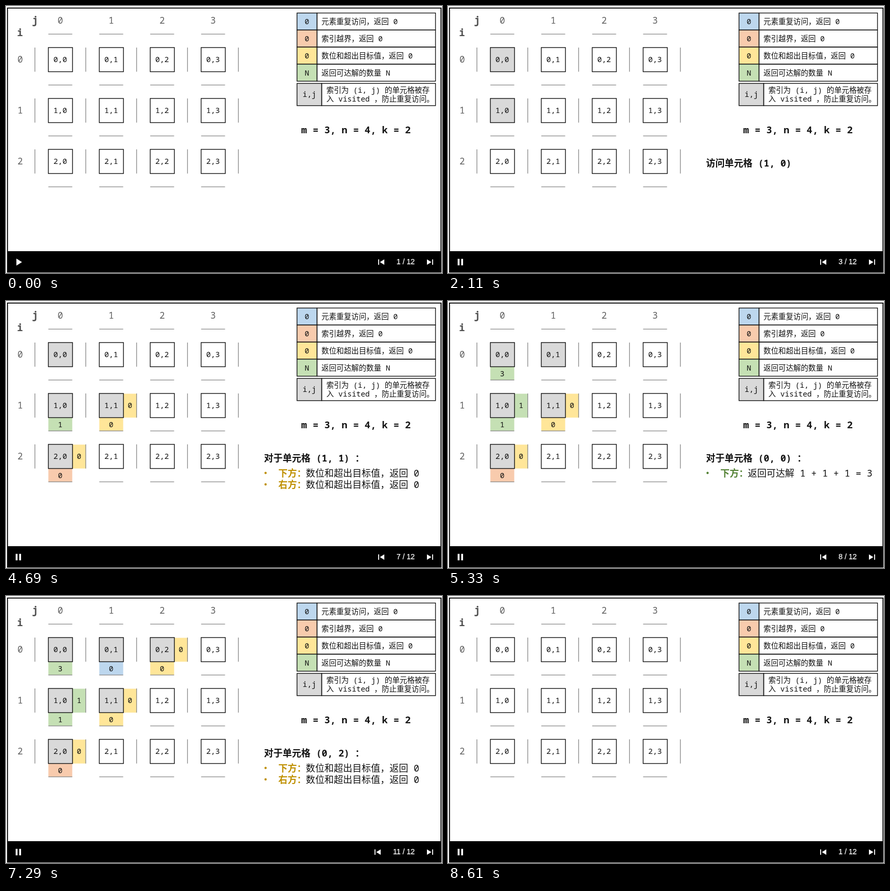
Animation, 839 px wide and 514 px high, one loop 8.66 s. Source, as an HTML page:

```html
<!DOCTYPE html>
<html lang="zh-CN">
<head>
<meta charset="utf-8">
<title>DFS</title>
<style>
  html, body { margin: 0; width: 100%; height: 100%; overflow: hidden; background: #fff; }
  svg { display: block; }
  text { font-family: "Noto Sans Mono", "Noto Sans CJK SC", "Noto Sans CJK", monospace; white-space: pre; }
  .ui { font-family: "Liberation Sans", Arial, sans-serif; }
</style>
</head>
<body>
<svg id="stage" width="839" height="514" viewBox="0 0 839 514"></svg>
<script>
const LOOP = 8660;
const SLIDE_AT = [0, 1470, 2110, 2750, 3410, 4070, 4690, 5330, 5990, 6650, 7290, 7950, 8610];
const PLAY_AT = 660;
const FILL = { gray: '#d9d9d9', blue: '#bdd7ee', orange: '#f8cbad', yellow: '#ffe699', green: '#c5e0b4' };
const INK = { blue: '#2e75b6', orange: '#c55a11', yellow: '#bf9000', green: '#548235' };
const STEP = 98, SIZE = 46.5, LEFT = 81.5, TOP = 80;
const stage = document.getElementById('stage');

function add(parent, tag, attrs, content) {
  const el = document.createElementNS('http://www.w3.org/2000/svg', tag);
  for (const k in attrs) el.setAttribute(k, attrs[k]);
  if (content !== undefined) el.textContent = content;
  parent.appendChild(el);
  return el;
}
const group = (parent = stage) => add(parent, 'g', {});
const rect = (p, x, y, width, height, attrs) => add(p, 'rect', { x, y, width, height, ...attrs });
const path = (p, d, attrs) => add(p, 'path', { d, ...attrs });
const text = (p, x, y, size, str, attrs) =>
  add(p, 'text', { x, y, 'font-size': size, fill: '#111', ...attrs }, str);
const mid = { 'text-anchor': 'middle' };
const bold = { 'font-weight': 700 };
const border = { fill: 'none', stroke: '#111', 'stroke-width': 1.4 };

rect(stage, 0, 0, 839, 514, { fill: '#fff' });

// Marks that stay once their slide is reached: slide, row, column, place, colour, value
const marks = [
  [2, 0, 0, 'cell'], [3, 1, 0, 'cell'], [4, 2, 0, 'cell'],
  [5, 2, 0, 'down', 'orange', 0], [5, 2, 0, 'right', 'yellow', 0],
  [6, 1, 0, 'down', 'green', 1], [6, 1, 1, 'cell'],
  [7, 1, 1, 'down', 'yellow', 0], [7, 1, 1, 'right', 'yellow', 0],
  [8, 1, 0, 'right', 'green', 1], [8, 0, 0, 'down', 'green', 3], [8, 0, 1, 'cell'],
  [9, 0, 1, 'down', 'blue', 0],
  [10, 0, 2, 'cell'],
  [11, 0, 2, 'down', 'yellow', 0], [11, 0, 2, 'right', 'yellow', 0],
  [12, 0, 1, 'right', 'green', 1], [12, 0, 0, 'right', 'green', 2]
].map(([from, r, c, place, color, value]) => {
  const el = group(), x = LEFT + c * STEP, y = TOP + r * STEP;
  if (place === 'cell') {
    rect(el, x, y, SIZE, SIZE, { fill: FILL.gray });
  } else if (place === 'down') {
    rect(el, x, y + SIZE, SIZE - 0.5, 25.5, { fill: FILL[color] });
    text(el, x + 22.8, y + 64.5, 14.4, value, mid);
  } else {
    rect(el, x + SIZE, y + 0.5, 25.5, SIZE - 0.5, { fill: FILL[color] });
    text(el, x + 59, y + 28.3, 14.4, value, mid);
  }
  return { el, from };
});

// Grid
const guide = { stroke: '#858585', 'stroke-width': 1.3 };
for (let r = 0; r < 4; r++)
  for (let c = 0; c < 4; c++)
    path(stage, `M${LEFT + c * STEP} ${54.2 + r * STEP}h46`, guide);
for (let r = 0; r < 3; r++)
  for (let c = 0; c < 5; c++)
    path(stage, `M${55.6 + c * 97.9} ${TOP + r * STEP}v${SIZE}`, guide);
for (let r = 0; r < 3; r++) {
  for (let c = 0; c < 4; c++) {
    const x = LEFT + c * STEP, y = TOP + r * STEP;
    rect(stage, x, y, SIZE, SIZE, border);
    text(stage, x + 23, y + 28.3, 14.6, `${r},${c}`, mid);
  }
}
const gray = { ...mid, fill: '#606060' };
for (let c = 0; c < 4; c++) text(stage, 104.5 + c * STEP, 33.5, 17.5, c, gray);
for (let r = 0; r < 3; r++) text(stage, 27.2, 108.8 + r * STEP, 17.5, r, gray);
text(stage, 56, 33.5, 19, 'j', { ...gray, ...bold, fill: '#505050' });
text(stage, 27, 58, 19, 'i', { ...gray, ...bold, fill: '#505050' });

// Legend
[
  ['blue', '0', '元素重复访问，返回 0'],
  ['orange', '0', '索引越界，返回 0'],
  ['yellow', '0', '数位和超出目标值，返回 0'],
  ['green', 'N', '返回可达解的数量 N']
].forEach(([color, key, label], i) => {
  const y = 13.5 + i * 32.8;
  rect(stage, 560, y, 38.5, 32.8, { ...border, fill: FILL[color] });
  rect(stage, 598.5, y, 228, 32.8, border);
  text(stage, 579, y + 21.6, 14.4, key, mid);
  text(stage, 607, y + 21.6, 14.4, label);
});
rect(stage, 560, 149, 47.5, 42.8, { ...border, fill: FILL.gray });
rect(stage, 607.5, 149, 219, 42.8, border);
text(stage, 584, 175.3, 14.6, 'i,j', mid);
text(stage, 616.5, 166.8, 14.4, '索引为 (i, j) 的单元格被存');
text(stage, 616.5, 184, 14.4, '入 visited ，防止重复访问。');
text(stage, 568, 245, 18.5, 'm = 3, n = 4, k = 2', bold);

// Notes: slide, heading, then bullet lines of colour, label, body
const OVER = '数位和超出目标值，返回 0';
const notes = [
  [2, '从单元格 (0, 0) 开始深度优先搜索'],
  [3, '访问单元格 (1, 0)'],
  [4, '访问单元格 (2, 0)'],
  [5, '对于单元格 (2, 0) ：', ['orange', '下方：', '索引越界，返回 0'], ['yellow', '右方：', OVER]],
  [6, '对于单元格 (1, 0) ：', ['green', '下方：', '返回可达解 1 + 0 + 0 = 1']],
  [7, '对于单元格 (1, 1) ：', ['yellow', '下方：', OVER], ['yellow', '右方：', OVER]],
  [8, '对于单元格 (0, 0) ：', ['green', '下方：', '返回可达解 1 + 1 + 1 = 3']],
  [9, '对于单元格 (0, 1) ：', ['blue', '下方：', '元素重复访问，返回 0']],
  [10, '访问单元格 (0, 2)'],
  [11, '对于单元格 (0, 2) ：', ['yellow', '下方：', OVER], ['yellow', '右方：', OVER]],
  [12, '对于单元格 (0, 0) ：', ['green', '右方：', '返回可达解 1 + 0 + 1 = 2']]
].map(([slide, head, ...lines]) => {
  const el = group();
  text(el, 496.5, 308.5, 17.9, head, bold);
  lines.forEach(([color, label, body], i) => {
    const y = 337.5 + i * 22;
    add(el, 'circle', { cx: 499.5, cy: y - 6.5, r: 2.2, fill: INK[color] });
    text(el, 524, y, 17.9, label, { ...bold, fill: INK[color] });
    text(el, 577, y, 17.9, body);
  });
  if (slide === 12) text(el, 49, 412, 17.9, '可达解总数为 1 + 3 + 2 = 6', bold);
  return { el, slide };
});

// Frame and player bar
rect(stage, 2.9, 3.9, 834.2, 508.4, { fill: 'none', stroke: '#000', 'stroke-width': 1.8 });
rect(stage, 2, 472, 836, 41, { fill: '#000' });
const white = { fill: '#fff' };
const playIcon = path(stage, 'M20 486.2v13.6l10.8-6.8z', white);
const pauseIcon = path(stage, 'M18.6 486.8h3.6v12.4h-3.6zM25.4 486.8h3.6v12.4h-3.6z', white);
const prevIcon = path(stage, 'M716.2 487.8h1.8v10.4h-1.8zM728 487.8v10.4l-8.6-5.2z', white);
path(stage, 'M810 487.8v10.4l8.6-5.2zM820 487.8h1.8v10.4h-1.8z', white);
const counter = text(stage, 786.5, 497.4, 14, '', {
  class: 'ui', 'text-anchor': 'end', fill: '#fff', stroke: '#fff', 'stroke-width': 0.25
});

// Pointer that presses the play button
const pointer = group();
path(pointer, 'M0 0v16.5l3.8-3.6 2.8 6.3 2.6-1.1-2.8-6.2h5.4z',
  { fill: '#fff', stroke: '#000', 'stroke-width': 1 });
const ring = add(stage, 'circle', { cx: 22, cy: 491, r: 11, fill: 'none', stroke: '#fff', 'stroke-width': 1.5 });

const show = (el, on) => el.setAttribute('display', on ? 'inline' : 'none');

function pointerAt(t) {
  if (t < 210 || t >= 1070) return null;
  if (t < 440) {
    const k = (Math.floor((t - 210) / 23) + 1) / 10, e = 1 - (1 - k) ** 2;
    return [2 + 20 * e, 512 - 21 * e];
  }
  if (t < 1030) return [22, 491];
  return t < 1050 ? [15, 498] : [6, 507];
}

function draw(t) {
  let slide = SLIDE_AT.filter(s => s <= t).length;
  if (slide > 12) slide = 1;
  for (const m of marks) show(m.el, slide >= m.from);
  for (const n of notes) show(n.el, slide === n.slide);
  const label = `${slide} / 12`;
  if (counter.textContent !== label) counter.textContent = label;
  prevIcon.setAttribute('transform', `translate(${slide > 9 ? -7 : 0} 0)`);
  show(playIcon, t < PLAY_AT);
  show(pauseIcon, t >= PLAY_AT);
  show(ring, t >= PLAY_AT && t < 810);
  const p = pointerAt(t);
  show(pointer, p);
  if (p) pointer.setAttribute('transform', `translate(${p[0]} ${p[1]})`);
}

const start = performance.now();
function tick() {
  draw((performance.now() - start) % LOOP);
  requestAnimationFrame(tick);
}
draw(0);
requestAnimationFrame(tick);
</script>
</body>
</html>
```
